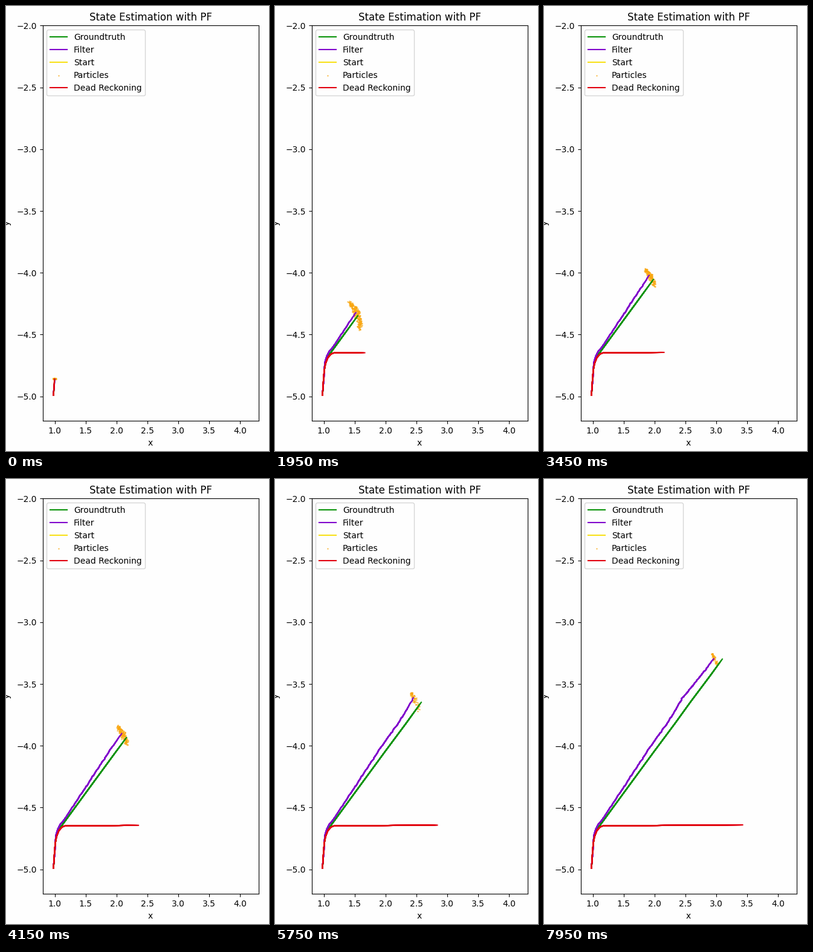
Recreate the animation shown at these times as a matplotlib script. Size 435x736 px, loop 8 s.

```python
import numpy as np
import matplotlib.pyplot as plt
from matplotlib.animation import FuncAnimation
from matplotlib.collections import LineCollection
from matplotlib.lines import Line2D

W, H, DPI = 435, 736, 100
LEFT, RIGHT, TOP, BOTTOM = 60, 417, 32, 686
GREEN, VIOLET, YELLOW = "#0a930a", "#8000cc", "#f9e11a"
ORANGE, RED, PAPER = "#f9a60e", "#e2000f", "#fefefe"
FIRST, LAST = -7, 119      # simulation steps, 15 per second
TICK = 50                  # ms
LAYERS = 12                # each step redraws the whole track over the last ones

# (step, x, y) in stage pixels
TRUTH = [(-7, 78, 644), (0, 80, 616), (2, 81, 602), (4, 83, 591), (6, 86, 582),
         (8, 90.5, 574.5), (10, 96, 567), (29, 137, 511), (52, 181, 451),
         (71, 216, 404), (86, 242, 368), (106, 275, 324), (119, 295, 296.5)]
FILTER = [(-7, 77.6, 644), (0, 80.4, 616), (2, 81, 601), (4, 82, 589),
          (6, 85, 579), (8, 89, 571), (10, 95, 564), (29, 134, 505.5),
          (52, 174, 444), (71, 207, 398), (86, 229, 361), (92, 238, 350),
          (106, 261, 322), (119, 281, 296)]
ODOMETRY = [(-7, 78, 644), (0, 79.8, 615.5), (2, 81, 602), (4, 83, 591),
            (6, 87, 581), (8, 92.5, 575), (9.5, 97, 573), (20, 127, 573),
            (29, 149, 573), (52, 199, 572.4), (86, 269, 572),
            (106, 306, 571.6), (119, 329, 571.6)]

# step, upper end dx dy, lower end dx dy, width, bow, count, skew
CLOUD = np.array([
    (0, -3, 0, 2, 0, .5, 0, 120, 1),
    (12, -7, -7, 4, 11, 1.2, 1, 220, 1),
    (29, -13, -18, 5, 31, 2.8, 6, 260, 1),
    (39, -10, -13, 8, 23, 2.6, 4, 220, 1),
    (52, -8, -10, 9, 20, 2.2, 2, 160, 1),
    (71, -8, -14, 9, 21, 2.6, 1, 170, 1),
    (86, -5, -8, 9, 25, 2.2, 1, 75, 1.3),
    (106, -4, -6, 6, 22, 1.7, 1, 60, 1.8),
    (119, -4, -8, 5, 12, 1.3, 0, 60, 1.2)])
CLOUD_STEPS = CLOUD[:, 0]

rng = np.random.default_rng(4)
along = rng.beta(1.3, 1.5, 260)
across = np.clip(rng.normal(size=260), -2, 2)


def to_data(px, py):
    return np.column_stack((0.8 + (px - LEFT) / (RIGHT - LEFT) * 3.5,
                            -2 - (py - TOP) / (BOTTOM - TOP) * 3.2))


def track(keys):
    when, x, y = np.array(keys).T
    steps = np.arange(FIRST, LAST + 1)
    return np.column_stack((np.interp(steps, when, x), np.interp(steps, when, y)))


truth, estimate, odometry = map(track, (TRUTH, FILTER, ODOMETRY))
estimate[18:-1] += rng.normal(0, 0.35, (len(estimate) - 19, 2))


def particles(step):
    x0, y0, x1, y1, width, bow, count, skew = (
        np.interp(step, CLOUD_STEPS, col) for col in CLOUD.T[1:])
    n = int(count)
    noise = np.random.default_rng(100 + step).normal(0, 1, (2, n))
    u = np.clip(along[:n] + 0.015 * noise[0], 0, 1) ** skew
    arch = 4 * u * (1 - u)
    side = bow * arch + width * (0.4 + 0.6 * arch) * (across[:n] + 0.15 * noise[1])
    dx, dy = x1 - x0, y1 - y0
    size = np.hypot(dx, dy)
    cx, cy = estimate[step - FIRST]
    return to_data(cx + x0 + u * dx + side * dy / size,
                   cy + y0 + u * dy - side * dx / size)


# The small surplus keeps rounding from losing a pixel.
fig = plt.figure(figsize=((W + 0.01) / DPI, (H + 0.01) / DPI), dpi=DPI,
                 facecolor=PAPER)
ax = fig.add_axes([(LEFT + .5) / W, 1 - (BOTTOM + .5) / H,
                   (RIGHT - LEFT) / W, (BOTTOM - TOP) / H], facecolor=PAPER)
ax.set(xlim=(0.8, 4.3), ylim=(-5.2, -2), xlabel="x",
       xticks=np.arange(1, 4.1, 0.5), yticks=np.arange(-5, -1.9, 0.5))
ax.set_title("State Estimation with PF")
fig.text(9 / W, 1 - 359 / H, "y", rotation=90, ha="right", va="center")

cloud = ax.scatter([], [], s=1, marker=".", color=ORANGE, zorder=1)
trails = []
for path, color in ((truth, GREEN), (estimate, VIOLET), (odometry, RED)):
    lines = LineCollection([], colors=color, linewidths=1.5, zorder=2)
    ax.add_collection(lines, autolim=False)
    trails.append((lines, to_data(*path.T)))


def key(color):
    return Line2D([], [], color=color, lw=1.5)


ax.legend([key(GREEN), key(VIOLET), key(YELLOW), cloud, key(RED)],
          ["Groundtruth", "Filter", "Start", "Particles", "Dead Reckoning"],
          loc="upper left", facecolor=PAPER)


def update(frame):
    step = int((frame + 0.5) * 0.75)
    end = step - FIRST + 1
    for lines, path in trails:
        lines.set_segments([path[:n] for n in range(max(2, end - LAYERS), end + 1)])
    cloud.set_offsets(particles(step))
    return [cloud] + [lines for lines, _ in trails]


anim = FuncAnimation(fig, update, frames=160, interval=TICK, repeat=True,
                     repeat_delay=0, blit=False)
plt.show()
```
